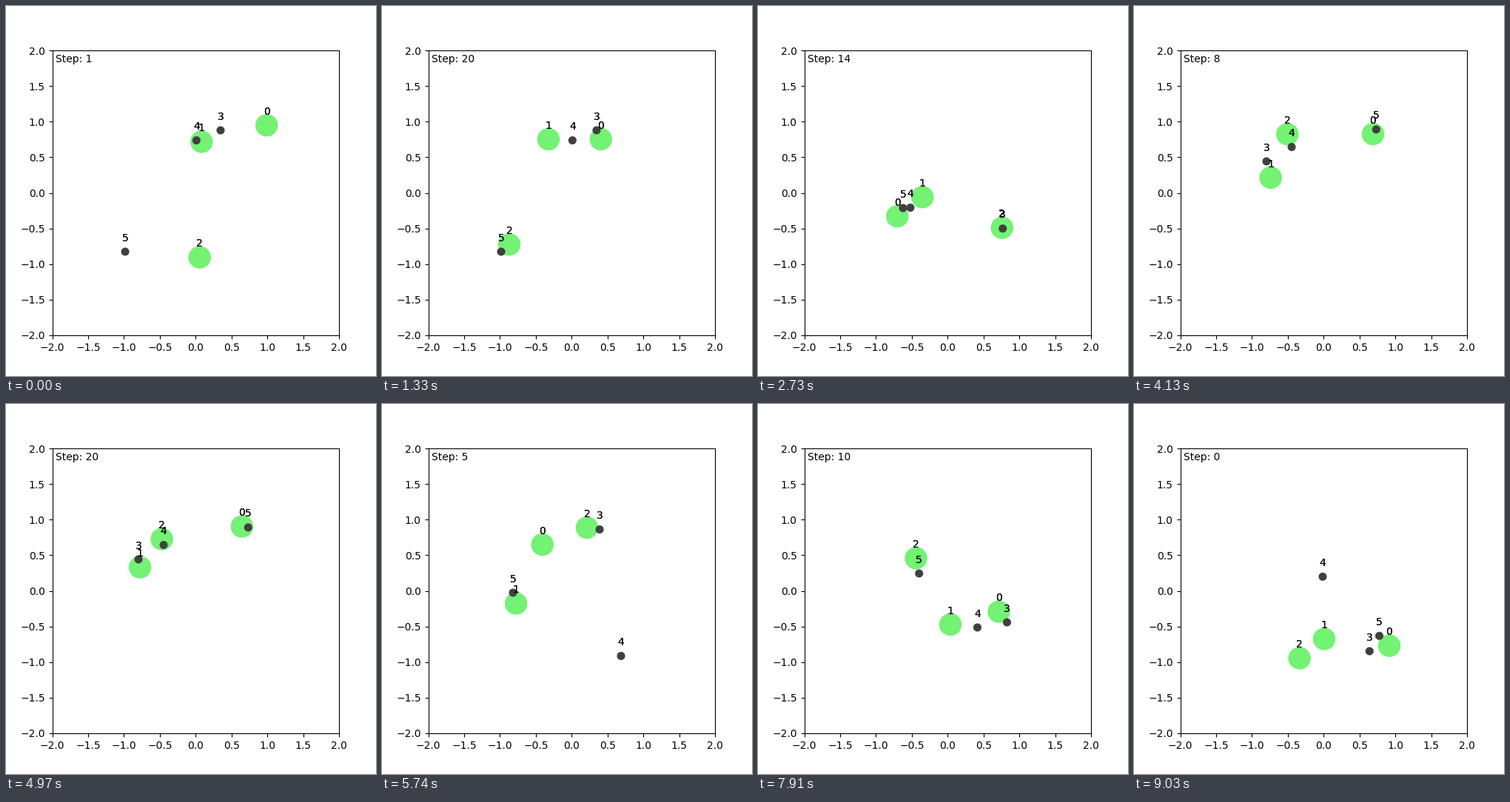
These frames come from a looping animation (500x500 px, 9100 ms). A matplotlib script:

```python
import numpy as np
import matplotlib.pyplot as plt
from matplotlib.animation import FuncAnimation
from matplotlib.patches import Circle

STEPS = 26
FRAMES = 130
GREEN = (0.45, 0.95, 0.45)
GREY = (0.25, 0.25, 0.25)

# Each episode: first step, waypoint step, landmarks (x, y) and
# agents (start x, start y, waypoint x, waypoint y, time constant).
EPISODES = [
    (1, 20,
     [(0.348, 0.878), (0.011, 0.737), (-0.983, -0.826)],
     [(0.991, 0.948, 0.408, 0.753, 4),
      (0.083, 0.717, -0.323, 0.753, 4),
      (0.056, -0.906, -0.870, -0.725, 4)]),
    (0, 14,
     [(0.769, -0.501), (-0.519, -0.208), (-0.622, -0.213)],
     [(-0.25, -0.75, -0.702, -0.329, 4),
      (0.05, 0.50, -0.351, -0.060, 4),
      (0.545, -0.852, 0.759, -0.491, 5)]),
    (0, 8,
     [(-0.797, 0.442), (-0.446, 0.644), (0.733, 0.890)],
     [(0.758, 0.70, 0.689, 0.826, 4),
      (-0.68, 0.02, -0.739, 0.213, 4),
      (-0.56, 0.98, -0.505, 0.823, 4)]),
    (0, 5,
     [(0.390, 0.862), (0.689, -0.914), (-0.818, -0.026)],
     [(-0.529, 0.805, -0.408, 0.649, 15),
      (-0.756, -0.265, -0.775, -0.177, 4),
      (0.111, 0.899, 0.214, 0.888, 4)]),
    (0, 10,
     [(0.828, -0.442), (0.415, -0.514), (-0.398, 0.244)],
     [(0.26, 0.104, 0.715, -0.293, 4),
      (-0.85, -0.22, 0.039, -0.473, 4),
      (-0.54, 0.95, -0.441, 0.459, 4)]),
    (0, 10,
     [(0.640, -0.847), (-0.013, 0.199), (0.777, -0.632)],
     [(0.916, -0.771, 0.916, -0.771, 4),
      (0.008, -0.675, 0.008, -0.675, 4),
      (-0.336, -0.945, -0.336, -0.945, 4)]),
]


def ease(t, tau):
    """Critically damped approach from 0 to 1."""
    return 1 - (1 + t / tau) * np.exp(-t / tau)


def agent_pos(agent, step, first, way):
    x0, y0, x1, y1, tau = agent
    k = ease(step - first, tau) / ease(way - first, tau)
    return x0 + (x1 - x0) * k, y0 + (y1 - y0) * k


fig, ax = plt.subplots(figsize=(5, 5), dpi=100)
ax.set_xlim(-2, 2)
ax.set_ylim(-2, 2)
ticks = np.arange(-2, 2.1, 0.5)
ax.set_xticks(ticks)
ax.set_yticks(ticks)

dots = [ax.add_patch(Circle((0, 0), 0.15 if n < 3 else 0.05,
                            color=GREEN if n < 3 else GREY))
        for n in range(6)]
# Labels are drawn twice for heavier edges.
labels = [[ax.text(0, 0, str(n), ha="center") for _ in range(2)]
          for n in range(6)]
counter = ax.text(-1.95, 1.95, "", va="top")


def update(i):
    episode, step = divmod(i + 1, STEPS)
    first, way, landmarks, agents = EPISODES[episode]
    places = [agent_pos(a, step, first, way) for a in agents] + landmarks
    for dot, pair, (x, y) in zip(dots, labels, places):
        dot.center = (x, y)
        for label in pair:
            label.set_position((x, y + 0.15))
    counter.set_text(f"Step: {step}")
    return dots + [counter]


anim = FuncAnimation(fig, update, frames=FRAMES, interval=70,
                     repeat=True, repeat_delay=0, blit=False)
plt.show()
```
